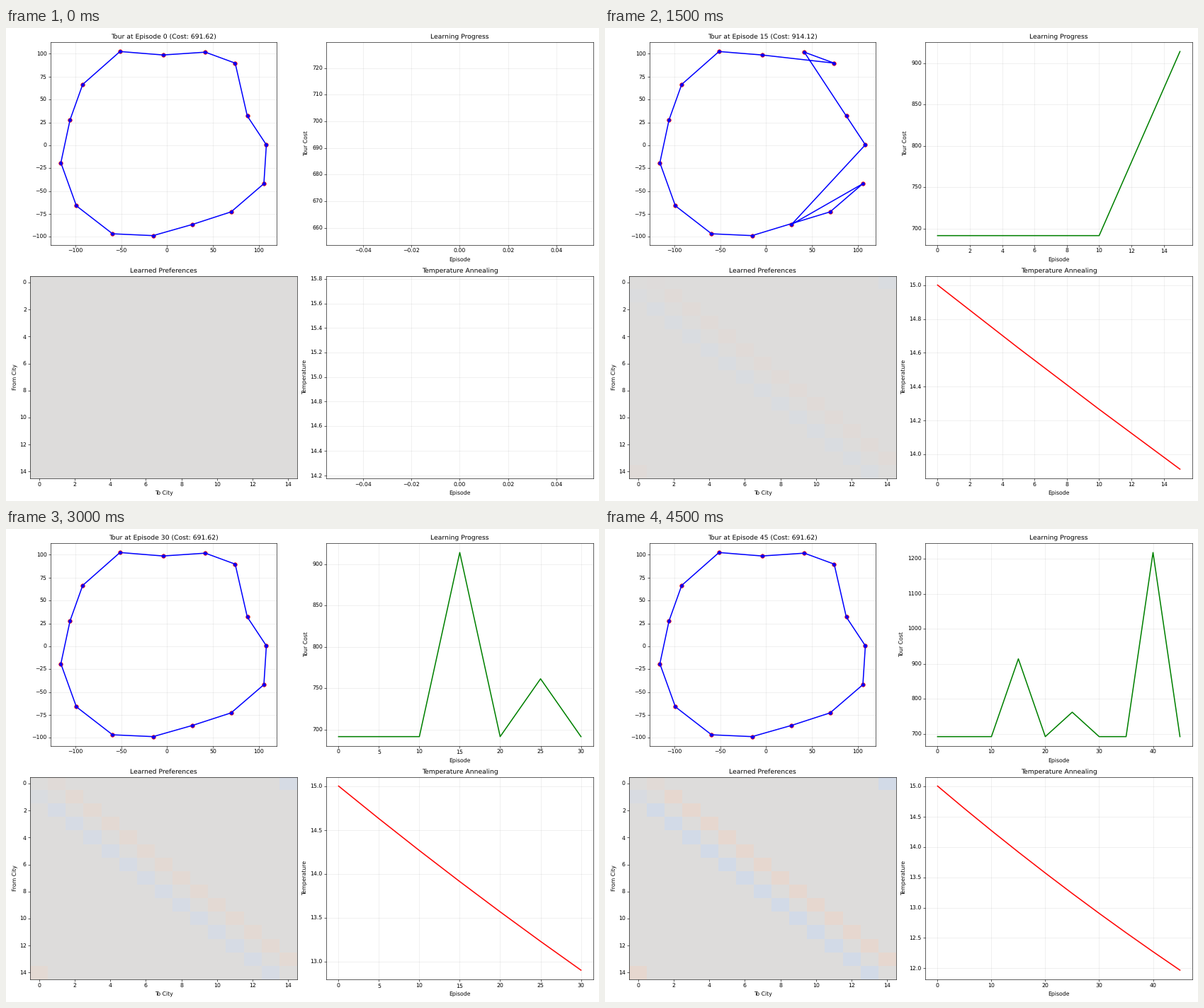
A matplotlib script that plays this animation: 837 by 669 pixels, repeating every 5000 ms.

```python
import numpy as np
import matplotlib.pyplot as plt
from matplotlib.animation import FuncAnimation

W, H = 837, 669
DPI, LAYOUT_DPI = 55.8, 100
STEP, FRAMES = 5, 10
N = 15

# Key points of the ring of cities, counter-clockwise from the right
CITIES = np.array([
    (108.3, 0.5), (87.5, 32), (74.3, 89.8), (41.7, 101.8), (-4.4, 98.7),
    (-51.4, 102.5), (-92.1, 66.5), (-105.9, 27.8), (-115.9, -19.1),
    (-99, -66.2), (-59.5, -96.8), (-15.3, -98.8), (27.9, -86.5),
    (69.9, -72.8), (105.6, -42)])


def route(late=(), swap=None):
    """Visit cities in ring order, the late ones last, one pair swapped."""
    order = [c for c in range(N) if c not in late] + list(late)
    if swap:
        i = order.index(swap)
        order[i:i + 2] = order[i + 1], order[i]
    return order


BEST = 691.62, route()
DETOURS = {
    15: (914.12, route(late=[12], swap=2)),
    25: (761.51, route(late=[1])),
    40: (1218.22, route(late=[9, 7], swap=2)),
}

plt.rcParams.update({"font.family": "DejaVu Sans", "text.hinting": "none"})
fig, axes = plt.subplots(2, 2, figsize=(W / DPI, H / DPI), dpi=DPI)
(tour_ax, cost_ax), (pref_ax, temp_ax) = axes


def fit_layout():
    # Text extents are finer at a higher resolution
    fig.set_dpi(LAYOUT_DPI)
    fig.tight_layout()
    fig.set_dpi(DPI)


def preferences(episode):
    """Forward steps gain and backward steps lose a little each episode."""
    step = np.roll(np.eye(N), 1, axis=1)
    step[0, 1] = 0.5
    return (step - step.T) * 0.072 * episode / 45


def draw_tour(episode):
    cost, order = DETOURS.get(episode, BEST)
    path = CITIES[order + order[:1]]
    tour_ax.scatter(*CITIES.T, c="red", s=50)
    tour_ax.plot(*path.T, "bo-", linewidth=2, markersize=5)
    tour_ax.set_title(f"Tour at Episode {episode} (Cost: {cost:.2f})")
    tour_ax.set_aspect("equal")
    tour_ax.grid(True, alpha=0.3)


def draw_preferences(episode):
    pref_ax.imshow(preferences(episode), cmap="coolwarm", vmin=-1, vmax=1,
                   aspect="auto")
    pref_ax.set(title="Learned Preferences", xlabel="To City",
                ylabel="From City")


def draw_curve(ax, x, y, color, title, ylabel):
    ax.plot(x, y, color=color, linewidth=2)
    ax.set(title=title, xlabel="Episode", ylabel=ylabel)
    ax.grid(True, alpha=0.3)


def update(frame):
    episode = frame * STEP
    episodes = np.arange(0, episode + 1, STEP)
    costs = [DETOURS.get(e, BEST)[0] for e in episodes]
    for ax in axes.flat:
        ax.clear()
    draw_tour(episode)
    draw_preferences(episode)
    draw_curve(cost_ax, episodes, costs, "green",
               "Learning Progress", "Tour Cost")
    draw_curve(temp_ax, episodes, 15 * 0.995 ** episodes, "red",
               "Temperature Annealing", "Temperature")
    fit_layout()
    return []


anim = FuncAnimation(fig, update, frames=FRAMES, init_func=lambda: update(0),
                     interval=500, repeat=True, repeat_delay=0)
plt.show()
```
